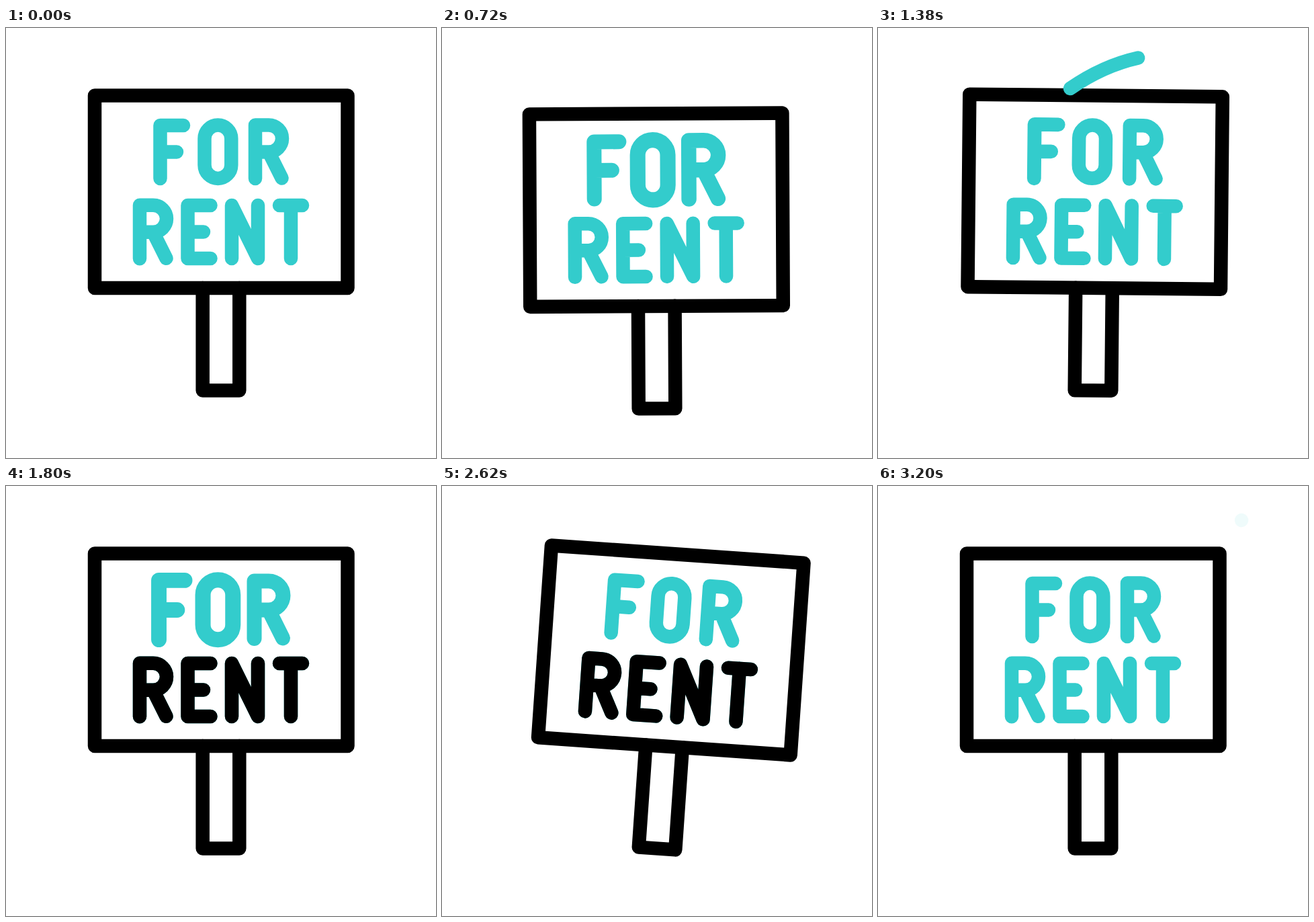
Write an HTML page that moves like this. It is 640 by 640 pixels and loops after 3.6 s.

```html
<!DOCTYPE html>
<html lang="en">
<head>
<meta charset="utf-8">
<title>For rent sign</title>
<style>
  html, body { margin: 0; width: 100%; height: 100%; overflow: hidden; background: #fff; }
  svg { display: block; width: 100vw; height: 100vh; }
  path, rect { fill: none; stroke-width: 20.5; stroke-linecap: round; stroke-linejoin: round; }
  .ink { stroke: #000; }
  .teal { stroke: #33cccc; }
</style>
</head>
<body>
<svg viewBox="0 0 640 640" role="img" aria-label="For rent">
  <g id="sign">
    <path class="ink" d="M292.7 387V539.5H347.3V387"/>
    <rect class="ink" x="132" y="100.5" width="376.5" height="286.5"/>
    <g id="top"></g>
    <g id="bottom"></g>
  </g>
  <path id="swoosh" class="teal" pathLength="1" d="M532 53Q400 11 286 90"/>
  <path id="ray" class="teal" pathLength="1" d="M541 51L582 27"/>
</svg>
<script>
const LOOP = 3600;
const $ = id => document.getElementById(id);

const R = 'M371 224V144.5H391a20 20 0 0 1 0 40H371M391 184.5L410.5 223.5';
const TOP = [
  { d: 'M229.5 224V145H264M229.5 184.5H254', cx: 246.5 },
  { d: 'M295.5 164.5a19.9 19.9 0 0 1 39.8 0V204a19.9 19.9 0 0 1 -39.8 0Z', cx: 315.4 },
  { d: R, cx: 391 }
];
const BOTTOM = [
  { d: R, shift: 'translate(-172 119.3)' },
  { d: 'M304.5 264H270.5V343H304.5M270.5 303.5H294' },
  { d: 'M336 343V264L375 343V264' },
  { d: 'M407 264H441M424 264V343' }
];

// [time, value] keys, eased between neighbours
const LIFT = [[240, 0], [476, -43], [785, 36], [1165, 0]];
const TILT = [[646, 0], [1165, -5], [1565, 5], [2035, -5], [2460, 5], [3010, 0]];
const HEAD = [[1180, 0], [1360, 1]];
const TAIL = [[1260, 0], [1480, 1]];
const RAY = [[2900, 0], [3040, 1], [3190, 0]];
const RAY_FADE = [[3100, 1], [3200, 0.08]];
const PULSES = [
  { start: 240, up: 300, down: 400 },
  { start: 1280, up: 440, down: 400 }
];

const ease = x => x * x * (3 - 2 * x);

function at(keys, t) {
  if (t <= keys[0][0]) return keys[0][1];
  for (let i = 1; i < keys.length; i++) {
    const [t0, v0] = keys[i - 1], [t1, v1] = keys[i];
    if (t < t1) return v0 + (v1 - v0) * ease((t - t0) / (t1 - t0));
  }
  return keys[keys.length - 1][1];
}

function pulse(t, delay) {
  return PULSES.reduce((sum, { start, up, down }) => {
    const s = start + delay;
    return sum + at([[s, 0], [s + up, 0.13], [s + up + down, 0]], t);
  }, 1);
}

function addLetter(group, { d, shift }, color) {
  const path = document.createElementNS('http://www.w3.org/2000/svg', 'path');
  path.setAttribute('d', d);
  path.setAttribute('class', color);
  if (shift) path.setAttribute('transform', shift);
  return group.appendChild(path);
}

const topLetters = TOP.map(l => addLetter($('top'), l, 'teal'));
BOTTOM.forEach(l => addLetter($('bottom'), l, 'teal'));
const shades = BOTTOM.map(l => addLetter($('bottom'), l, 'ink'));

function trim(path, from, to, visible) {
  path.style.display = visible ? '' : 'none';
  path.setAttribute('stroke-dasharray', `${Math.max(to - from, 0.001)} 9`);
  path.setAttribute('stroke-dashoffset', -from);
}

function draw(t) {
  $('sign').setAttribute('transform',
    `translate(0 ${at(LIFT, t)}) rotate(${at(TILT, t)} 320 540)`);

  topLetters.forEach((path, i) => {
    const { cx } = TOP[i];
    path.setAttribute('transform',
      `translate(${cx} 184.3) scale(${pulse(t, i * 140)}) translate(${-cx} -184.3)`);
  });

  shades.forEach((path, i) => {
    const d = i * 40;
    path.style.opacity = at([[1440 + d, 0], [1560 + d, 1], [2780 + d, 1], [2900 + d, 0]], t);
  });

  trim($('swoosh'), at(TAIL, t), at(HEAD, t), t >= 1180 && t < 1480);
  trim($('ray'), 0, at(RAY, t), t >= 2900);
  $('ray').style.opacity = at(RAY_FADE, t);
}

const begin = performance.now();
function tick() {
  const t = (performance.now() - begin) % LOOP;
  draw(Math.floor(t / 20) * 20);
  requestAnimationFrame(tick);
}
draw(0);
requestAnimationFrame(tick);
</script>
</body>
</html>
```
